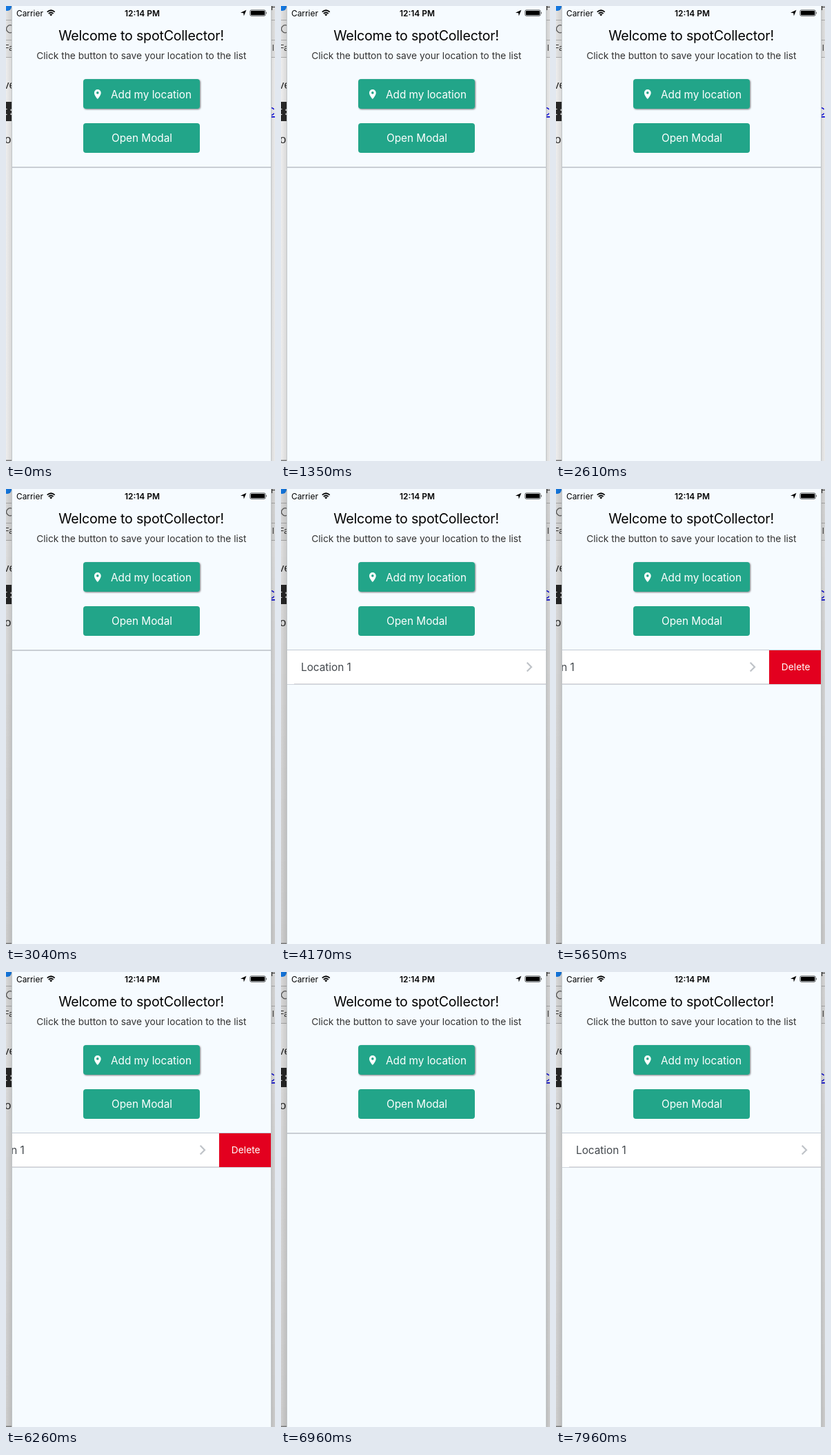
These frames come from a looping animation (390x660 px, 8000 ms). An HTML page:

```html
<!DOCTYPE html>
<html lang="en">
<head>
<meta charset="utf-8">
<title>Saved locations</title>
<style>
  html, body { margin: 0; width: 100%; height: 100%; overflow: hidden; background: #fff; }
  svg { display: block; width: 390px; height: 660px; }
  text { font-family: Inter, Roboto, sans-serif; font-size: 15.3px; }
  .title { font-size: 19.6px; letter-spacing: -.2px; }
  .small { font-size: 13.75px; }
  .status { font-size: 11.9px; }
  .mid { text-anchor: middle; }
  .page { font-family: "Liberation Sans", Arial, sans-serif; font-size: 17px; fill: #333; }
  .tool { font-size: 12px; }
  .link { fill: #00e; text-decoration: underline; }
  .code { font: 15px "DejaVu Sans Mono", monospace; }
  .button { fill: #22a589; }
  .light { fill: #fff; }
  #row, #focus { opacity: 0; }
</style>
</head>
<body>
<svg viewBox="0 0 390 660">
  <defs>
    <clipPath id="screen"><rect x="9" width="375" height="660"/></clipPath>
    <linearGradient id="leftShade">
      <stop stop-opacity=".07"/><stop offset="1" stop-opacity=".16"/>
    </linearGradient>
    <linearGradient id="rightShade">
      <stop stop-opacity=".16"/><stop offset="1" stop-opacity=".08"/>
    </linearGradient>
    <linearGradient id="focusShade" x2="0" y2="1">
      <stop stop-opacity=".04"/><stop offset=".3" stop-opacity=".09"/><stop offset="1" stop-opacity=".13"/>
    </linearGradient>
    <filter id="lift" x="-5%" y="-10%" width="112%" height="125%">
      <feDropShadow dx="1" dy="1" stdDeviation=".8" flood-opacity=".5"/>
    </filter>
  </defs>

  <!-- Browser page behind the phone -->
  <rect width="390" height="660" fill="#fff"/>
  <rect width="390" height="74" fill="#f3f3f3"/>
  <path d="M0 20.5H390M0 49.5H390M0 74.5H390" stroke="#bbb"/>
  <circle cx="2" cy="1" r="6" fill="#1683f5"/>
  <path d="M9 28.5A5.5 5.5 0 1 0 9 38" fill="none" stroke="#666" stroke-width="1.3"/>
  <text class="page tool" x="-3" y="65">Fa</text>
  <text class="page" x="-4" y="120">ve</text>
  <rect y="139" width="9" height="28" fill="#2b2b2b"/>
  <text class="code light" x="-6" y="158">t:</text>
  <text class="page" x="-2" y="199">o</text>
  <text class="page tool" x="384" y="6">H</text>
  <text class="page tool" x="386" y="65">l</text>
  <text class="page link" x="377.5" y="159">C</text>
  <rect width="9" height="660" fill="url(#leftShade)"/>
  <rect x="384" width="6" height="660" fill="url(#rightShade)"/>
  <rect id="focus" width="390" height="660" fill="url(#focusShade)"/>
  <rect y="658.5" width="9" height="1.5" fill="#777"/>

  <rect x="8.5" y="-1" width="376" height="662" fill="#f6fbff" stroke="#b9bcbf" stroke-width=".8"/>

  <!-- Status bar -->
  <text class="status" x="15" y="14.5">Carrier</text>
  <path d="M59.7 8.7Q65.2 3.8 70.7 8.7M61.8 11Q65.2 8 68.6 11" fill="none" stroke="#000" stroke-width="1.7"/>
  <path d="M63.2 12.4Q65.2 10.8 67.2 12.4L65.2 14.5Z"/>
  <text class="status mid" x="197.5" y="14.5" font-weight="600">12:14 PM</text>
  <path d="M348.5 5.8 344.8 14.4 344.3 10.2 340 9.7Z"/>
  <rect x="353.9" y="5.9" width="22.2" height="8.4" rx="1.8" fill="none" stroke="#000" stroke-width=".7"/>
  <rect x="355" y="7" width="20" height="6.2" rx=".8"/>
  <path d="M377 8.5q1.6 1.6 0 3.2z"/>

  <text class="title mid" x="196" y="49.5">Welcome to spotCollector!</text>
  <text class="small mid" x="196.4" y="77.3" fill="#333">Click the button to save your location to the list</text>

  <rect class="button" x="112" y="106" width="169" height="43" rx="4" filter="url(#lift)"/>
  <path class="light" fill-rule="evenodd" d="M132.8 121a4.9 4.9 0 0 0-4.9 4.9c0 3.7 4.9 9.1 4.9 9.1s4.9-5.4 4.9-9.1a4.9 4.9 0 0 0-4.9-4.9zm0 3.1a1.8 1.8 0 1 1 0 3.6 1.8 1.8 0 0 1 0-3.6z"/>
  <text class="light" x="152" y="133.7">Add my location</text>
  <rect class="button" x="112" y="170" width="169" height="43" rx="4"/>
  <text class="light mid" x="197" y="197">Open Modal</text>

  <!-- Saved list -->
  <rect x="9" y="233" width="375" height="2" fill="#c9ced4"/>
  <g id="row" clip-path="url(#screen)">
    <rect x="9" y="233" width="375" height="51" fill="#fff"/>
    <path d="M9 233.5H384M9 283.3H384" stroke="#c3cbd5"/>
    <g id="slide">
      <rect x="9" y="234" width="375" height="49" fill="#fff"/>
      <path d="M19 282.7H384" stroke="#c8c7cc" stroke-width=".8"/>
      <text x="29" y="264" fill="#43484d">Location 1</text>
      <path d="M356.7 251.8 363 258.2 356.7 264.6" fill="none" stroke="#bfc3c8" stroke-width="2.2"/>
      <rect x="384" y="234" width="75" height="49" fill="#e3001f"/>
      <text class="small light mid" x="422.7" y="263.2">Delete</text>
    </g>
  </g>
</svg>
<script>
  const LOOP = 8000;

  // steps: [time in ms, value, easing]
  function play(id, property, steps) {
    const frames = steps.map(([time, value, easing = 'steps(1, end)']) =>
      ({ offset: time / LOOP, [property]: value, easing }));
    document.getElementById(id).animate(frames, { duration: LOOP, iterations: Infinity });
  }

  play('focus', 'opacity', [[0, 0], [2850, 1], [LOOP, 1]]);
  play('row', 'opacity', [[0, 0], [3050, 1], [6300, 0], [7250, 1], [LOOP, 1]]);
  play('slide', 'transform', [
    [0, 'translateX(0px)'],
    [4600, 'translateX(0px)', 'ease-in-out'],
    [5200, 'translateX(-75px)'],
    [6300, 'translateX(0px)'],
    [LOOP, 'translateX(0px)']
  ]);
</script>
</body>
</html>
```
